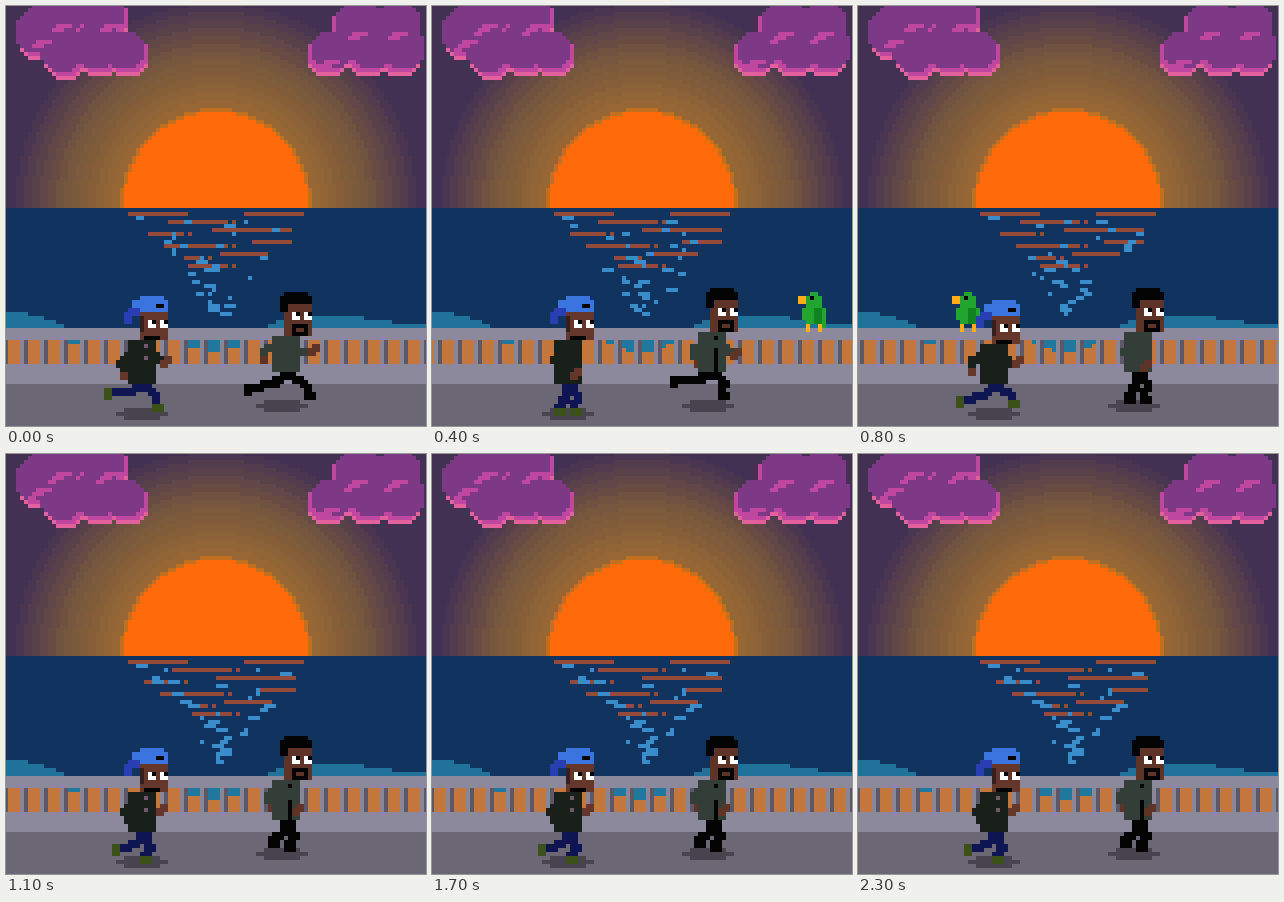
Animation, 420 px wide and 420 px high, one loop 2400 ms. Source, as an HTML page with a canvas:

```html
<!DOCTYPE html>
<html lang="en">
<head>
<meta charset="utf-8">
<title>Sunset run</title>
<style>
html, body { margin: 0; width: 100%; height: 100%; overflow: hidden; background: #433153; }
canvas { display: block; width: 420px; height: 420px; }
</style>
</head>
<body>
<canvas id="stage" width="420" height="420"></canvas>
<script>
const ctx = document.getElementById('stage').getContext('2d');
const STEP = 100, STEPS = 24, CYCLE = 6, WIDTH = 106;
const SCROLL = 17; // cells the scenery travels per step
const BLACK = '#050405', WHITE = '#ffffff';

// One art pixel is 4 px; the grid starts half a cell outside the stage.
ctx.setTransform(4, 0, 0, 4, -2, -2);

function rect(color, x, y, w = 1, h = 1) {
  ctx.fillStyle = color;
  ctx.fillRect(Math.round(x), Math.round(y), w, h);
}

function disc(color, cx, cy, r, bottom = WIDTH) {
  for (let y = Math.floor(cy - r); y < Math.min(cy + r, bottom); y++) {
    const dy = y + 0.5 - cy;
    if (Math.abs(dy) >= r) continue;
    const half = Math.sqrt(r * r - dy * dy);
    const left = Math.round(cx - half);
    rect(color, left, y, Math.round(cx + half) - left);
  }
}

// A chain of straight strokes, two cells thick.
function limb(color, ...points) {
  for (let i = 1; i < points.length; i++) {
    const [ax, ay] = points[i - 1], [bx, by] = points[i];
    const n = Math.ceil(Math.max(Math.abs(bx - ax), Math.abs(by - ay), 1));
    for (let j = 0; j <= n; j++) {
      rect(color, ax + (bx - ax) * j / n, ay + (by - ay) * j / n, 2, 2);
    }
  }
}

const joint = (a, b, dx, dy) => [(a[0] + b[0]) / 2 + dx, (a[1] + b[1]) / 2 + dy];
const hump = (x, center, half) => Math.cos(Math.min(Math.abs(x - center) / half, 1) * Math.PI / 2);

function randomFrom(seed) {
  return () => (seed = seed * 16807 % 2147483647) / 2147483647;
}

function sky() {
  rect('#433153', 0, 0, WIDTH, 51);
  const near = [155, 106, 51], mid = [119, 87, 62], far = [67, 49, 83];
  for (let r = 52; r > 24; r -= 2) {
    const t = (r - 24) / 28;
    const [from, to, u] = t < 0.5 ? [near, mid, t * 2] : [mid, far, t * 2 - 1];
    const mixed = from.map((c, i) => Math.round(c + (to[i] - c) * u));
    disc(`rgb(${mixed})`, 53, 50, r, 51);
  }
  disc('#c36f20', 53, 50, 23.8, 51);
  disc('#ff6b0a', 53, 50, 23, 51);
}

// Lobes are [x, y, radius]; the sunlit side faces the middle of the stage.
const clouds = [
  { sun: 1, lobes: [[13.5, 5, 6.5], [9, 9, 5.5], [25.5, 4.5, 5.5], [15.5, 13.5, 5.6], [24, 12.5, 6], [31, 13.5, 5]] },
  { sun: -1, lobes: [[88, 6.5, 6], [97.5, 6.5, 5.6], [81, 13.5, 5], [91, 12.5, 6], [99, 13, 5.2]] }
];

function drawClouds(spread) {
  for (const { sun, lobes } of clouds) {
    const layer = (color, dx, dy) => lobes.forEach(([x, y, r]) => disc(color, x - dx * sun, y - dy, r));
    layer('#e2609c', 0, 0);
    layer('#c0479f', 0, 1);
    layer('#7d3886', 1, 2);
    for (const [x, y] of lobes.slice(0, 3)) {
      rect('#c0479f', x - 1, y, 4);
      rect('#c0479f', x - 2, y + 1, 3);
      if (spread) rect('#c0479f', x - 3, y + 2, 2);
    }
  }
}

// Sun reflections: [x, y, width].
const streaks = [
  [31, 52, 15], [60, 52, 15], [41, 54, 15], [52, 56, 20], [36, 57, 9], [62, 59, 10],
  [40, 60, 16], [54, 62, 12], [45, 63, 5], [46, 65, 10]
];

function sea(k) {
  rect('#10335f', 0, 51, WIDTH, 33);
  const late = k > 2;
  for (const [x, y, w] of streaks) {
    const shift = late && y > 52 ? (x < 41 ? -1 : 1) : 0;
    rect('#964a3a', x + shift, y, w);
    if (y > 52 && x + w < 57) rect('#964a3a', x + w + 1 + shift, y);
  }
  const random = randomFrom(97 + k * 61);
  for (let y = 53; y < 78; y++) {
    const half = Math.min(20, (79 - y) * 0.8);
    for (let i = 0; i < (y % 3 ? 1 : 2); i++) {
      rect('#3a8dcb', 53 + (random() * 2 - 1) * half, y, 1 + Math.floor(random() * 2.5));
    }
  }
  for (let x = 0; x < WIDTH; x++) {
    const right = x > 65 ? Math.max(1, 3 * hump(x, 82, 21)) : 0;
    const h = Math.round(4 * hump(x, 0, 16) + right);
    if (h) rect('#20729a', x, 81 - h, 1, h);
  }
}

function fence(k) {
  rect('#c4773d', 0, 84, WIDTH, 6);
  for (let x = 0; x < WIDTH; x++) {
    const wash = Math.round(3 * hump(x, 52, 9) + hump(x, 18, 3));
    if (wash) rect('#20789f', x, 84, 1, wash);
  }
  for (let x = 4 - k * SCROLL % 5 - 5; x < WIDTH; x += 5) {
    rect('#898797', x, 84, 1, 6);
    rect('#5d5868', x + 1, 84, 1, 6);
  }
  rect('#8b899b', 0, 81, WIDTH, 3);
  rect('#8b899b', 0, 90, WIDTH, 5);
}

function road() {
  rect('#6c6774', 0, 95, WIDTH, 11);
  for (const [x, y] of [[28, 101], [63, 99]]) {
    rect('#474450', x + 2, y, 9, 3);
    rect('#474450', x, y + 1, 13);
  }
}

function parrot(x) {
  disc('#22a52e', x + 4, 74, 2);
  disc('#22a52e', x + 4, 77.5, 2.8);
  rect('#128321', x + 4, 76, 2, 4);
  rect('#22a52e', x + 6, 77, 1, 4);
  rect('#ffad16', x, 73, 2, 2);
  for (const leg of [2, 5]) rect('#ffad16', x + leg, 80, 1, 2);
  rect(BLACK, x + 3, 73);
}

// Key poses: back foot, front foot, back hand, front hand.
const ORDER = [0, 1, 2, 0, 1, 3];

const capped = {
  x: 34, top: 84, hip: 95,
  coat: '#191f19', skin: '#65372a', strip: '#74566c', cloth: '#0e1552', shoes: '#3c5019',
  dips: [2, 3], open: [0, 3],
  poses: [
    [[27, 96], [37, 99], [29, 92], [40, 88]],
    [[31, 100], [35, 100], [33, 90], [36, 91]],
    [[27, 98], [38, 98], [28, 91], [40, 88]],
    [[29, 98], [34, 100], [31, 92], [39, 88]]
  ],
  head(d) {
    rect(this.skin, 34, 77 + d, 7, 7);
    rect('#351f1c', 34, 78 + d, 1, 4);
    rect('#3974df', 34, 73 + d, 6);
    rect('#3974df', 32, 74 + d, 9, 3);
    rect('#2a3eb4', 31, 76 + d, 3, 2);
    rect('#2a3eb4', 30, 77 + d, 2, 3);
    rect(BLACK, 38, 75 + d, 2);
    rect(BLACK, 35, 83 + d, 4);
    eyes(36, 79 + d);
  }
};

const bearded = {
  x: 70, top: 82, hip: 92,
  coat: '#343e39', skin: '#5e3429', strip: BLACK, cloth: BLACK, shoes: BLACK,
  dips: [0], open: [1, 3],
  poses: [
    [[62, 95], [75, 96], [64, 88], [77, 85]],
    [[62, 93], [72, 96], [66, 89], [76, 86]],
    [[67, 97], [71, 97], [69, 89], [72, 89]],
    [[66, 96], [70, 97], [66, 88], [73, 88]]
  ],
  head(d) {
    rect(this.skin, 70, 74 + d, 7, 8);
    rect(BLACK, 70, 71 + d, 6);
    rect(BLACK, 69, 72 + d, 8, 2);
    rect(BLACK, 69, 74 + d, 2, 2);
    rect(BLACK, 72, 79 + d, 4, 3);
    rect(this.skin, 73, 80 + d, 2);
    eyes(72, 76 + d);
  }
};

function eyes(x, y) {
  for (const dx of [0, 3]) {
    rect(WHITE, x + dx, y, 2, 2);
    rect(BLACK, x + dx + 1, y);
  }
}

function runner(who, k) {
  const pose = ORDER[k];
  const [backFoot, frontFoot, backHand, frontHand] = who.poses[pose];
  const drop = who.dips.includes(pose) ? 1 : 0;
  const top = who.top + drop;

  for (const [foot, side] of [[backFoot, -1], [frontFoot, 1]]) {
    const hip = [who.x + side, who.hip];
    limb(who.cloth, hip, joint(hip, foot, 1, 0), foot);
    const [x, y] = foot;
    if (x < who.x - 4) rect(who.shoes, x - 2, y, 2, 3);
    else rect(who.shoes, x, y + 1, 3, 2);
  }

  const backShoulder = [who.x - 2, top + 1], frontShoulder = [who.x + 1, top + 2];
  limb(who.coat, backShoulder, joint(backShoulder, backHand, -2.5, 0), backHand);
  rect(who.skin, ...backHand, 2, 2);
  rect(who.coat, who.x - 3, top, 7, who.hip - top);
  if (who.open.includes(pose)) rect(who.strip, who.x + 1, top + 1, 1, who.strip === BLACK ? 9 : 4);

  const elbow = joint(frontShoulder, frontHand, 0, 1);
  limb(who.coat, frontShoulder, elbow);
  rect(who.skin, ...frontHand, 2, 2);
  rect(who.skin, frontHand[0] - 1, frontHand[1] + 1, 2, 2);
  who.head(drop);
}

function draw(step) {
  const k = step % CYCLE;
  sky();
  drawClouds(k > 2);
  sea(k);
  fence(k);
  road();
  parrot(92 - (step - 4) * SCROLL);
  runner(capped, k);
  runner(bearded, k);
}

const start = performance.now();
function tick() {
  draw(Math.floor((performance.now() - start) / STEP) % STEPS);
  requestAnimationFrame(tick);
}
tick();
</script>
</body>
</html>
```
